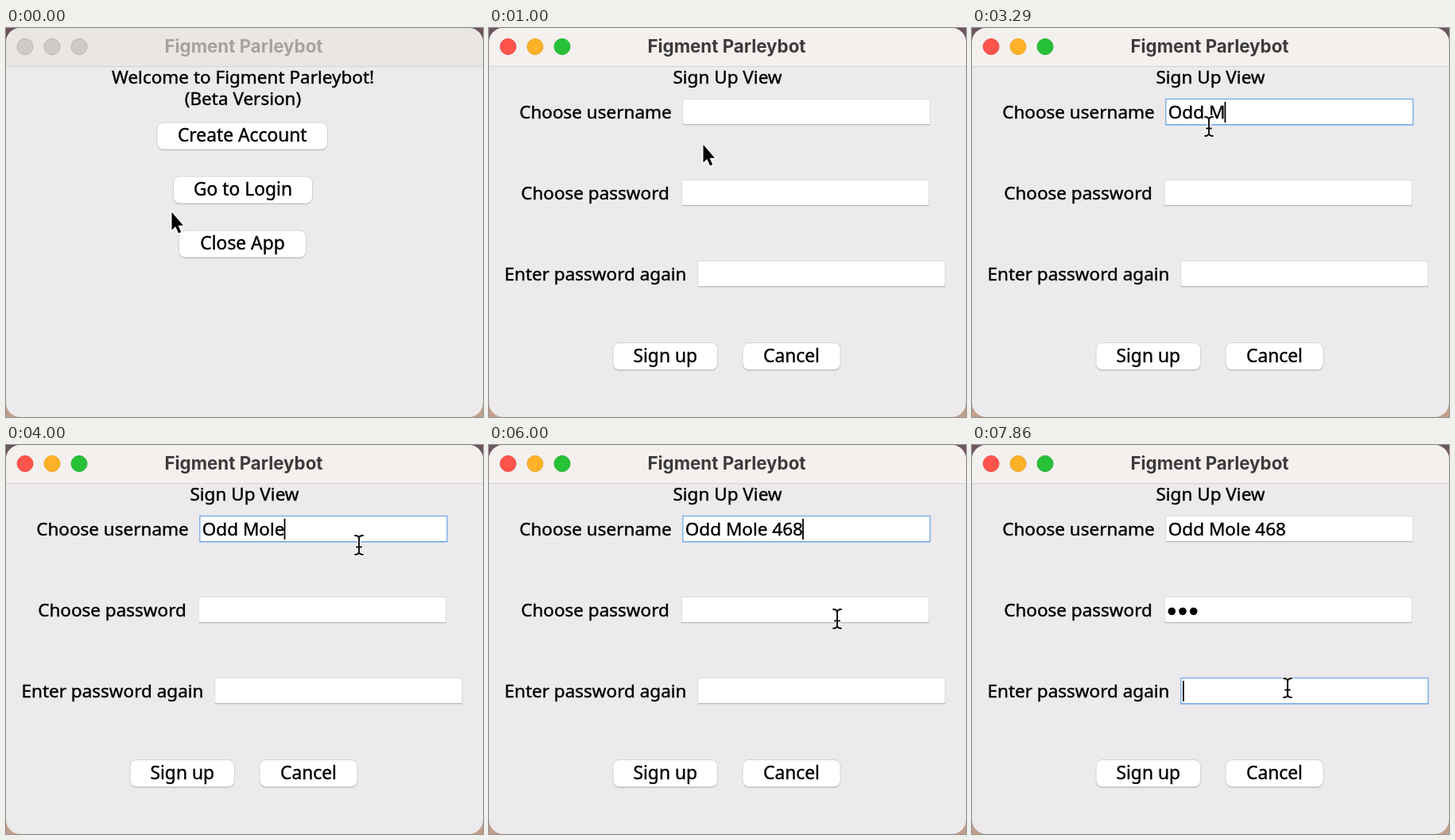
These frames come from a looping animation (600x490 px, 8 s). An HTML page:

```html
<!DOCTYPE html>
<html lang="en">
<head>
<meta charset="utf-8">
<title>Figment Parleybot</title>
<style>
  html, body { margin: 0; width: 100%; height: 100%; overflow: hidden; }
  svg { display: block; width: 100%; height: 100%; }
  text { font: 22.5px "Noto Sans", "Open Sans", sans-serif; fill: #000; stroke: #000; stroke-width: .4; white-space: pre; }
  .mid { text-anchor: middle; }
  .caption { font-size: 22.8px; }
  #title { font: 700 22.3px Inter, Roboto, sans-serif; stroke: none; }
  .button { fill: #fff; stroke: #d4d2d4; stroke-width: 1; }
  .button-shade { fill: #bcbabc; }
</style>
</head>
<body>
<svg id="stage" viewBox="0 0 600 490">
  <defs>
    <linearGradient id="desktop" x2="0" y2="1">
      <stop offset="0" stop-color="#6d545e"/>
      <stop offset="1" stop-color="#c2a08a"/>
    </linearGradient>
    <clipPath id="frame"><rect width="600" height="490" rx="18"/></clipPath>
  </defs>
  <rect width="600" height="490" fill="url(#desktop)"/>
  <g clip-path="url(#frame)">
    <rect width="600" height="490" fill="#eceaec"/>
    <rect id="bar" width="600" height="48"/>
    <rect y="48" width="600" height="1" fill="#d5d2d2"/>
  </g>
  <g id="lights"></g>
  <text id="title" class="mid" x="299" y="31">Figment Parleybot</text>
  <g id="welcome"></g>
  <g id="signup"></g>
  <rect id="caret" width="1.8" height="26" fill="#000"/>
  <g id="arrow">
    <path d="M1.5 2V24.5L6.2 20L10 28.5L13.2 27L9.6 18.8H16Z" fill="#000" stroke="#fff"
      stroke-width="3.6" stroke-linejoin="round" paint-order="stroke"/>
  </g>
  <g id="ibeam" fill="none" stroke-linecap="round"></g>
</svg>
<script>
const $ = id => document.getElementById(id);

function add(parent, tag, attrs, content = '') {
  const node = document.createElementNS('http://www.w3.org/2000/svg', tag);
  for (const key in attrs) node.setAttribute(key, attrs[key]);
  node.textContent = content;
  return parent.appendChild(node);
}

const set = (node, attrs) => {
  for (const key in attrs) node.setAttribute(key, attrs[key]);
};
const show = (node, on) => { node.style.display = on ? '' : 'none'; };

const label = (parent, x, y, content, style = 'mid') =>
  add(parent, 'text', { class: style, x, y }, content);

function button(parent, x, y, width, caption) {
  add(parent, 'rect', { class: 'button-shade', x, y: y + 1.3, width, height: 34, rx: 8 });
  add(parent, 'rect', { class: 'button', x, y, width, height: 34, rx: 8 });
  label(parent, x + width / 2, y + 24, caption, 'mid caption');
}

function field(x, y) {
  const box = add($('signup'), 'rect', { x, y, width: 311, height: 32.5, fill: '#fff' });
  const base = add($('signup'), 'rect', { x, y: y + 31.7, width: 311, height: 1 });
  const value = add($('signup'), 'text', { x: x + 3, y: y + 24.5 });
  const dots = [0, 1, 2].map(i =>
    add($('signup'), 'circle', { cx: x + 9 + 13.7 * i, cy: y + 18, r: 4.8, fill: '#000' }));
  return { x, y, box, base, value, dots };
}

// Welcome screen
label($('welcome'), 298, 70, 'Welcome to Figment Parleybot!');
label($('welcome'), 298, 97, '(Beta Version)');
button($('welcome'), 190, 119, 214.5, 'Create Account');
button($('welcome'), 210.5, 187, 175, 'Go to Login');
button($('welcome'), 217.5, 255, 160, 'Close App');

// Sign-up screen
label($('signup'), 300, 70, 'Sign Up View');
label($('signup'), 134, 114, 'Choose username');
label($('signup'), 133.5, 216, 'Choose password');
label($('signup'), 134, 318, 'Enter password again');
const fields = [field(243.8, 89.5), field(242.3, 191.5), field(262.8, 293.5)];
button($('signup'), 156, 396.5, 131.5, 'Sign up');
button($('signup'), 319, 396.5, 123, 'Cancel');

const lights = [24, 58, 92].map(cx => add($('lights'), 'circle', { cx, cy: 23.5, r: 10 }));
const lightColors = [['#ff544b', '#ec4d45'], ['#ffb227', '#eaa524'], ['#27c138', '#24b034']];

const beam = 'M-5-12Q0-12 0-8V8Q0 12-5 12M5-12Q0-12 0-8M5 12Q0 12 0 8M-3 2.5H3';
add($('ibeam'), 'path', { d: beam, stroke: '#fff', 'stroke-width': 4.4 });
add($('ibeam'), 'path', { d: beam, stroke: '#111', 'stroke-width': 2 });

// Each step overrides part of the state: arrow/ibeam place the pointer.
const NAME = 'Odd Mole 468';
const LOOP = 8000;
const steps = [
  [0, { active: false, signup: false, focus: -1, typed: 0, dots: 0, caret: true, arrow: [207, 230] }],
  [140, { arrow: [224, 206] }],
  [280, { arrow: [254, 164] }],
  [430, { arrow: [268, 145] }],
  [570, { active: true }],
  [1000, { signup: true }],
  [1570, { ibeam: [292, 126] }],
  [1710, { ibeam: [298, 124], focus: 0 }],
  [2290, { caret: false }],
  [2570, { caret: true, typed: 1 }],
  [2710, { typed: 2 }],
  [2860, { typed: 3 }],
  [3000, { typed: 4 }],
  [3290, { typed: 5 }],
  [3430, { typed: 6 }],
  [3710, { typed: 7 }],
  [3860, { typed: 8, ibeam: [385, 125] }],
  [4000, { ibeam: [444, 126] }],
  [4140, { ibeam: [452, 118] }],
  [4290, { ibeam: [456, 109] }],
  [4430, { caret: false }],
  [4570, { caret: true, typed: 9 }],
  [4710, { typed: 10 }],
  [4860, { typed: 11 }],
  [5000, { typed: 12 }],
  [5290, { arrow: [453, 140] }],
  [5430, { arrow: [448, 200] }],
  [5570, { arrow: [446, 230], caret: false }],
  [6000, { ibeam: [438, 219], caret: true }],
  [6140, { focus: 1 }],
  [6710, { caret: false }],
  [6860, { caret: true, dots: 1 }],
  [7000, { dots: 2 }],
  [7140, { dots: 3 }],
  [7290, { arrow: [428, 232] }],
  [7430, { arrow: [414, 262] }],
  [7570, { arrow: [404, 284] }],
  [7710, { ibeam: [397, 306] }],
  [7860, { focus: 2 }]
];

function stateAt(time) {
  const state = {};
  for (const [start, change] of steps) {
    if (start > time) break;
    Object.assign(state, change);
    if (change.arrow) state.ibeam = null;
    if (change.ibeam) state.arrow = null;
  }
  return state;
}

function placePointer(node, point) {
  show(node, point);
  if (point) node.setAttribute('transform', `translate(${point})`);
}

function render(state) {
  set($('bar'), { fill: state.active ? '#f4f0ee' : '#eae6e4' });
  $('title').style.fill = state.active ? '#3c3a3a' : '#a5a2a1';
  lights.forEach((light, i) => {
    const [fill, stroke] = state.active ? lightColors[i] : ['#d0cbc9', '#b9b4b2'];
    set(light, { fill, stroke });
  });
  show($('welcome'), !state.signup);
  show($('signup'), state.signup);

  fields.forEach((f, i) => {
    const focused = i === state.focus;
    set(f.box, { stroke: focused ? '#7caee8' : '#dddbdd', 'stroke-width': focused ? 1.4 : 1 });
    set(f.base, { fill: focused ? '#7caee8' : '#b3b1b3' });
    f.value.textContent = i === 0 ? NAME.slice(0, state.typed) : '';
    f.dots.forEach((dot, n) => show(dot, i === 1 && n < state.dots));
  });

  const current = fields[state.focus];
  show($('caret'), current && state.caret);
  if (current) {
    const width = state.focus === 0
      ? current.value.getComputedTextLength()
      : state.focus === 1 ? state.dots * 13.7 : 0;
    set($('caret'), { x: current.x + 2.2 + width, y: current.y + 3.5 });
  }
  placePointer($('arrow'), state.arrow);
  placePointer($('ibeam'), state.ibeam);
}

const origin = performance.now();
function tick() {
  render(stateAt((performance.now() - origin) % LOOP));
  requestAnimationFrame(tick);
}
tick();
</script>
</body>
</html>
```
